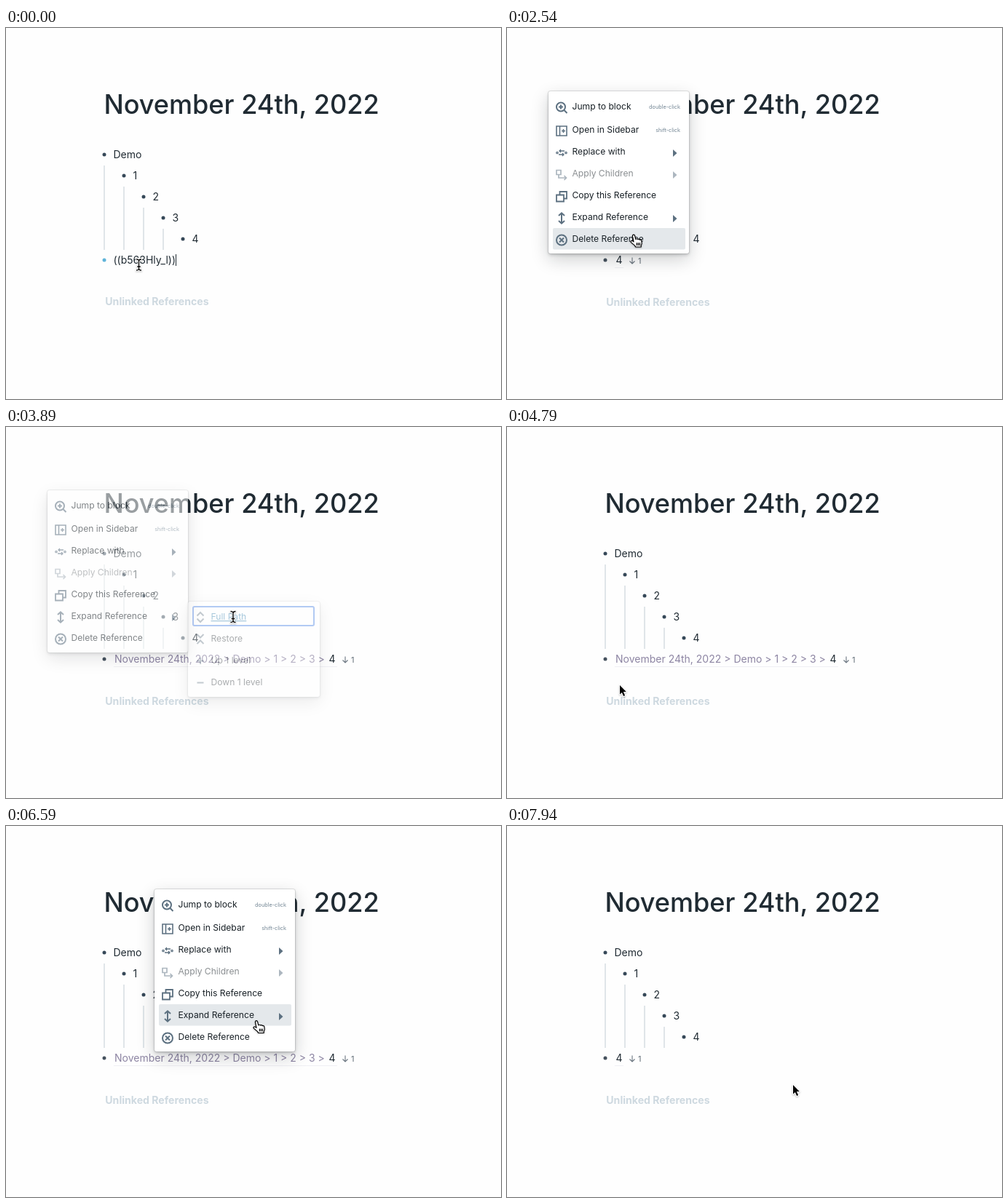
Recreate the animation shown at these times as an HTML page. Size 680x510 px, loop 8000 ms.

```html
<!DOCTYPE html>
<html lang="en">
<head>
<meta charset="utf-8">
<title>Block reference menu</title>
<style>
html, body { margin: 0; width: 100%; height: 100%; overflow: hidden; background: #fefefe; }
#stage { position: relative; width: 680px; height: 510px; overflow: hidden; }
svg { position: absolute; left: 0; top: 0; overflow: visible; }
text { font-family: Inter, sans-serif; font-size: 14px; fill: #202b33; white-space: pre; }
.pop { position: absolute; background: #fff; border-radius: 3px;
  box-shadow: 0 0 0 1px rgba(16,22,26,.1), 0 2px 4px rgba(16,22,26,.2), 0 8px 24px rgba(16,22,26,.2); }
.pop text { font-size: 12.1px; fill: #182026; }
.pop .hint { font-size: 7.3px; fill: #738694; text-anchor: end; }
.icon { fill: none; stroke: #5c7080; stroke-width: 2; }
.solid { fill: #5c7080; stroke: none; }
.off { opacity: .5; }
.hot { fill: #e4e8eb; }
.pop .link { fill: #106ba3; text-decoration: underline; }
#main { left: 57px; top: 87px; width: 193px; height: 223px; }
#sub { left: 250px; top: 240px; width: 181px; height: 131px; }
#cursor { filter: drop-shadow(0 1px 1px rgba(0,0,0,.25)); }
</style>
</head>
<body>
<div id="stage">
  <svg width="680" height="510" viewBox="0 0 680 510">
    <text x="134.4" y="118" style="font-size:36.1px;font-weight:500">November 24th, 2022</text>
    <g id="outline"></g>
    <circle id="dot" cx="135" cy="319" r="2.5"/>
    <g id="edit">
      <text x="147.5" y="323.5">((b563Hly_l))</text>
      <path d="M233.5 311V327" stroke="#202b33"/>
    </g>
    <g id="ref">
      <path id="rule" stroke="#f0f0f4"/>
      <text id="crumb" x="149" y="323.5" style="fill:#8d85a3">November 24th, 2022 &gt; Demo &gt; 1 &gt; 2 &gt; 3 &gt; </text>
      <g id="tail">
        <text x="149.5" y="323.5">4</text>
        <path d="M172 315.5V324M168.5 320.5 172 324 175.5 320.5" fill="none" stroke="#6b7680" stroke-width="1.1"/>
        <text x="180" y="323.5" style="font-size:11px;fill:#5f6b75">1</text>
      </g>
    </g>
    <text id="unlinked" x="136.3" style="font-size:14.1px;font-weight:700;fill:#ced9e0">Unlinked References</text>
  </svg>
  <div class="pop" id="main"><svg width="193" height="223" viewBox="57 87 193 223"></svg></div>
  <div class="pop" id="sub"><svg width="181" height="131" viewBox="250 240 181 131"></svg></div>
  <svg width="680" height="510" viewBox="0 0 680 510"><g id="cursor" stroke-linejoin="round" stroke-linecap="round"></g></svg>
</div>
<script>
const LOOP = 8000, SHIFT = 147;
const $ = id => document.getElementById(id);

// Icons are centred on 0,0 in a 16 px box.
const icons = {
  zoom: '<circle cx="-1" cy="-1" r="6"/><path d="M3.5 3.5 7.5 7.5M-4-1H2M-1-4V2"/>',
  sidebar: '<path d="M-7-6.5H7V6.5H-7ZM-2.5-6.5V6.5M0 0H5M2.5-2.5V2.5" stroke-width="1.6"/>',
  swap: '<g stroke-width="1.3"><circle cx="-6" cy="0" r="1.2"/><circle cx="6" cy="0" r="1.2"/><path d="M4-2.5H-3M-1-4.5-3-2.5-1-.5M-4 2.5H3M1 .5 3 2.5 1 4.5"/></g>',
  flow: '<path d="M-7-6H-1V0H-7ZM-4 0V4.5H6M3.5 1.5 6.5 4.5 3.5 7.5" stroke-width="1.7"/>',
  copy: '<path d="M-7-2H3V7H-7ZM-2.5-2V-6.5H7V3H3" stroke-width="1.8"/>',
  expand: '<path d="M0-7V7M-4-3.5 0-7.2 4-3.5M-4 3.5 0 7.2 4 3.5"/>',
  cross: '<circle r="7"/><path d="M-3-3 3 3M3-3-3 3"/>',
  spread: '<path d="M-4.5-2 0-6.5 4.5-2M-4.5 2 0 6.5 4.5 2"/>',
  fold: '<path d="M-4.5-6.5 0-2 4.5-6.5M-4.5 6.5 0 2 4.5 6.5"/>',
  plus: '<path d="M-4.5 0H4.5M0-4.5V4.5"/>',
  minus: '<path d="M-4.5 0H4.5"/>'
};

const mainRows = [
  ['Jump to block', 'zoom', 108, 'double-click'],
  ['Open in Sidebar', 'sidebar', 140, 'shift-click'],
  ['Replace with', 'swap', 170, '>'],
  ['Apply Children', 'flow', 200, '>', 'off'],
  ['Copy this Reference', 'copy', 230],
  ['Expand Reference', 'expand', 260, '>'],
  ['Delete Reference', 'cross', 290]
];
const subRows = [
  ['Full Path', 'spread', 261], ['Restore', 'fold', 291],
  ['Up 1 level', 'plus', 321], ['Down 1 level', 'minus', 351]
];

function row([label, icon, y, extra, cls = ''], iconX, iconDy, textX) {
  let end = '';
  if (extra === '>') end = `<path class="solid" d="M228 ${y - 3}V${y + 7}L233.5 ${y + 2}Z"/>`;
  else if (extra) end = `<text class="hint" x="238" y="${y + 2.5}">${extra}</text>`;
  return `<g class="${cls}"><g class="icon" transform="translate(${iconX} ${y + iconDy})">${icons[icon]}</g>
    <text x="${textX}" y="${y + 4}">${label}</text>${end}</g>`;
}
const hotRect = (x, w) => `<rect class="hot" x="${x}" width="${w}" height="29.5" rx="2"/>`;
$('main').firstChild.innerHTML = hotRect(63, 182) + mainRows.map(r => row(r, 75, 1.5, 89.5)).join('');
$('sub').firstChild.innerHTML = hotRect(256, 168) + subRows.map(r => row(r, 267, .5, 281.5)).join('') +
  '<rect id="ring" x="257" width="166" height="26" rx="2" fill="none" stroke="#2f6fe0" stroke-width="2"/>';
const mainHot = $('main').querySelector('.hot');
const subHot = $('sub').querySelector('.hot');
const subText = $('sub').querySelectorAll('text');

$('outline').innerHTML = ['Demo', 1, 2, 3, 4].map((label, i) => {
  const x = 135 + 27 * i, y = 174 + 29 * i;
  return `<circle cx="${x}" cy="${y}" r="2.5" fill="#364858"/><text x="${x + 12.5}" y="${y + 4.5}">${label}</text>` +
    (i < 4 ? `<path d="M${x} ${y + 15}V305" stroke="#d8dfe4" stroke-width="1.6"/>` : '');
}).join('');

const beam = 'M-3-7.5Q0-7.5 0-5 0-7.5 3-7.5M0-5V5M-3 7.5Q0 7.5 0 5 0 7.5 3 7.5M-1.8 2.5H1.8';
const shapes = {
  arrow: '<path d="M.5 1V13.5L3.4 10.9 5.6 16 7.6 15.1 5.4 10.1H9.3Z" stroke="#fff" stroke-width="2" paint-order="stroke"/>',
  beam: `<path d="${beam}" fill="none" stroke="#fff" stroke-width="3"/><path d="${beam}" fill="none" stroke="#000" stroke-width="1.3"/>`,
  hand: '<path d="M-1.6 1.3Q-1.4-.4 0-.4 1.2-.3 1.6 1.2L2.8 5.8Q4.8 4.6 5.6 6 7.2 5 8.2 6.6 10.2 6 10.8 8L11.2 11.5Q11 13 10.2 14.4V16.5H2.6L1.6 14.6-3.4 10.4Q-4.6 9-3.6 8.2-2.4 7.4 0 9.4ZM4.4 11V14M6.4 11V14M8.4 11V14" fill="#fff" stroke="#000" stroke-width="1.2"/>',
  palm: '<path d="M-3.5 8-4.5 5.5-7.6 1.5Q-8-.2-6.5-.5L-4.2 1.5-6.4-3.5Q-6.5-5.6-4.8-5.3L-2.6-1-3.3-6Q-2.6-7.8-1.2-6.5L-.4-1.2 0-7Q1-8.4 2-7L2.2-1 3.6-5.6Q5-6.6 5.5-5L4.8 0 6.2-2.5Q7.6-3.2 7.7-1.5L6.5 3.5 5.2 5.5V8Z" fill="#fff" stroke="#000" stroke-width="1.2"/>'
};

// [start ms, shape, x, y]
const moves = [
  [0, 'beam', 182.5, 325.5], [300, 'arrow', 120, 342], [450, 'arrow', 60, 362], [600, 'arrow', 37, 368],
  [900, 'arrow', 72, 356], [1050, 'arrow', 112, 338], [1200, 'palm', 140, 332], [1350, 'palm', 142, 331],
  [1490, 'hand', 146, 323], [2390, 'hand', 164, 296], [2540, 'hand', 174, 284.5], [2690, 'hand', 183, 267],
  [3290, 'hand', 262, 262], [3440, 'hand', 311, 258], [3890, 'beam', 312, 261], [4040, 'beam', 300, 266],
  [4190, 'arrow', 215, 300], [4340, 'arrow', 90, 340], [4490, 'arrow', 11, 358], [4640, 'arrow', 85, 360],
  [4790, 'arrow', 154.5, 354], [4940, 'arrow', 178, 353], [5090, 'arrow', 230, 350], [5240, 'arrow', 300, 344],
  [5390, 'arrow', 368, 335], [5540, 'hand', 410, 324], [5690, 'hand', 422, 319], [6440, 'hand', 380, 291],
  [6590, 'hand', 344, 268], [6890, 'hand', 372, 264], [7040, 'hand', 425, 261], [7190, 'hand', 440, 290],
  [7640, 'arrow', 434, 304], [7790, 'arrow', 409, 338], [7940, 'arrow', 392.5, 355]
];
// Stepped values: [start ms, value]
const mainFade = [[0, 0], [1940, .5], [2090, 1], [3890, .54], [4040, 0], [6140, .5], [6290, 1], [7490, .54], [7640, 0]];
const subFade = [[0, 0], [2840, .5], [2990, 1], [3890, .36], [4040, 0], [6740, .5], [6890, 1], [7490, .36], [7640, 0]];
const mainPick = [[0, 0], [2390, 290], [2690, 260], [3890, 0], [6440, 290], [6590, 260], [7490, 0]];
const subPick = [[0, 0], [3290, 261], [3890, 0], [7040, 261], [7190, 291], [7490, 0]];
const focus = [[0, 0], [3890, 261], [4040, 0], [7490, 291], [7640, 0]];

const at = (keys, t) => keys.filter(k => k[0] <= t).pop();
const step = (keys, t) => at(keys, t)[1];
const show = (el, on) => { el.style.display = on ? '' : 'none'; };

function place(el, alpha, dx) {
  show(el, alpha > 0);
  el.style.opacity = alpha;
  el.style.transform = `translateX(${dx}px)`;
}
function pick(rect, y) {
  show(rect, y);
  rect.setAttribute('y', y - 15);
}

let shape = '';
function draw(t) {
  const editing = t < 300, full = t >= 3890 && t < 7490;
  show($('edit'), editing);
  show($('ref'), !editing);
  show($('crumb'), full);
  $('tail').setAttribute('transform', `translate(${full ? 294 : 0} 0)`);
  $('rule').setAttribute('d', `M148 329.5H${full ? 455 : 160}`);
  $('dot').setAttribute('fill', editing ? '#5fb4d9' : '#46525e');
  $('unlinked').setAttribute('y', editing ? 380.5 : 381.5);

  const dx = t > 6000 ? SHIFT : 0;
  place($('main'), step(mainFade, t), dx);
  place($('sub'), step(subFade, t), dx);
  pick(mainHot, step(mainPick, t));
  const hover = step(subPick, t), ring = step(focus, t);
  pick(subHot, hover);
  show($('ring'), ring);
  $('ring').setAttribute('y', ring - 14);
  subText.forEach((el, i) => el.classList.toggle('link', subRows[i][2] === (hover || ring)));

  const [, kind, x, y] = at(moves, t);
  if (kind !== shape) $('cursor').innerHTML = shapes[shape = kind];
  $('cursor').setAttribute('transform', `translate(${x} ${y})`);
}

const begin = performance.now();
function tick() {
  draw((performance.now() - begin) % LOOP);
  requestAnimationFrame(tick);
}
tick();
</script>
</body>
</html>
```
